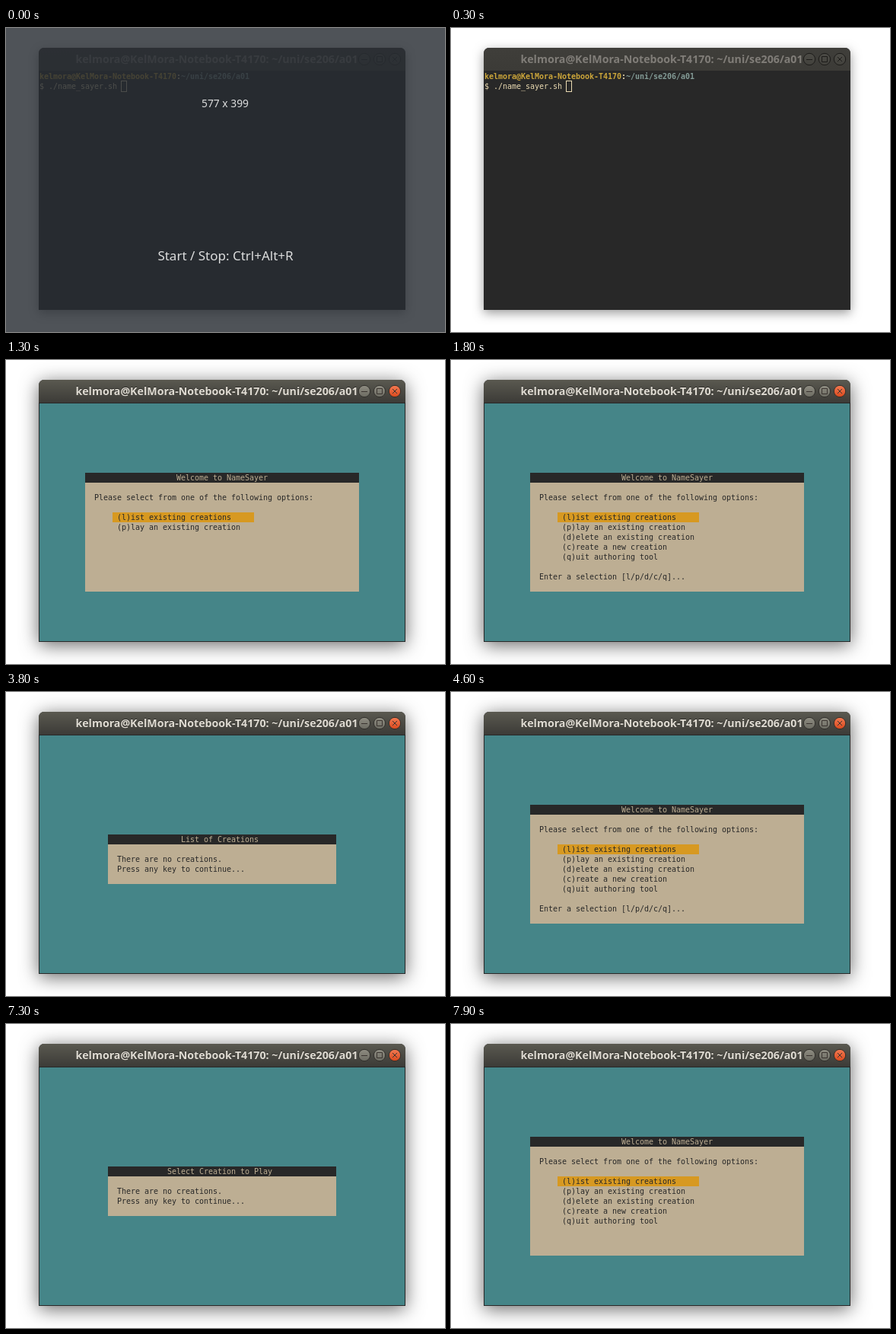
These frames come from a looping animation (577x399 px, 8 s). An HTML page with a canvas:

```html
<!DOCTYPE html>
<html lang="en">
<head>
<meta charset="utf-8">
<title>Terminal session</title>
<style>
html, body { margin: 0; width: 100%; height: 100%; overflow: hidden; background: #fff; }
canvas { display: block; width: 577px; height: 399px; }
</style>
</head>
<body>
<canvas id="stage" width="577" height="399"></canvas>
<script>
const ctx = document.getElementById('stage').getContext('2d');
const LOOP = 8000;
const SANS = '"Noto Sans", "Open Sans", sans-serif';
const MONO = '"DejaVu Sans Mono", monospace';
const USER = 'kelmora';
const HOST = 'KelMora-Notebook-T4170';
const DIR = '~/uni/se206/a01';
const C = {
  bg: '#282828', fg: '#ebdbb2', teal: '#458588', panel: '#bdae93',
  gold: '#d79921', user: '#cba53a', path: '#839b96'
};
const WIN = { x: 43, y: 26, w: 482, h: 344, bar: 30 };
const CELL = { x: 44, y: 57, w: 6, h: 13 };
const ITEMS = [
  '(l)ist existing creations',
  '(p)lay an existing creation',
  '(d)elete an existing creation',
  '(c)reate a new creation',
  '(q)uit authoring tool'
];

function rect(x, y, w, h, color) {
  ctx.fillStyle = color;
  ctx.fillRect(x, y, w, h);
}

function cells(col, row, cols, rows, color) {
  rect(CELL.x + col * CELL.w, CELL.y + row * CELL.h, cols * CELL.w, rows * CELL.h, color);
}

// Terminal text sits on a fixed character grid.
function print(text, col, row, color, bold) {
  ctx.font = (bold ? 'bold ' : '') + '10px ' + MONO;
  ctx.textAlign = 'left';
  ctx.fillStyle = color;
  [...text].forEach((ch, i) =>
    ctx.fillText(ch, CELL.x + (col + i) * CELL.w, CELL.y + row * CELL.h + 10));
}

function label(text, y, font, color) {
  ctx.font = font;
  ctx.textAlign = 'center';
  ctx.fillStyle = color;
  ctx.fillText(text, 0, y);
}

function centred(text, x, y, font, color) {
  ctx.save();
  ctx.translate(x, 0);
  label(text, y, font, color);
  ctx.restore();
}

function button(x, kind, focused) {
  const y = 41;
  const g = ctx.createLinearGradient(0, y - 8, 0, y + 8);
  const close = kind === 'close';
  const tones = !focused ? ['#4c4b46', '#42413c']
    : close ? ['#f37b53', '#d9481c'] : ['#8f8d82', '#6b6a61'];
  g.addColorStop(0, tones[0]);
  g.addColorStop(1, tones[1]);
  ctx.beginPath();
  ctx.arc(x, y, 7.7, 0, Math.PI * 2);
  ctx.fillStyle = g;
  ctx.fill();
  ctx.lineWidth = 1;
  ctx.strokeStyle = focused ? '#2f2e2a' : '#1c1b19';
  ctx.stroke();

  ctx.beginPath();
  if (kind === 'min') {
    ctx.moveTo(x - 4, y + 0.5);
    ctx.lineTo(x + 4, y + 0.5);
  } else if (kind === 'max') {
    ctx.rect(x - 3.5, y - 3.5, 7, 7);
  } else {
    ctx.moveTo(x - 3, y - 3);
    ctx.lineTo(x + 3, y + 3);
    ctx.moveTo(x + 3, y - 3);
    ctx.lineTo(x - 3, y + 3);
  }
  ctx.strokeStyle = focused ? '#3a3430' : '#1c1b19';
  ctx.stroke();
}

function frame(focused) {
  const { x, y, w, h, bar } = WIN;
  rect(0, 0, 577, 399, '#fff');

  ctx.save();
  ctx.shadowColor = focused ? 'rgba(0,0,0,.6)' : 'rgba(0,0,0,.4)';
  ctx.shadowBlur = focused ? 24 : 14;
  ctx.shadowOffsetY = 4;
  ctx.beginPath();
  ctx.roundRect(x, y, w, h, [7, 7, 0, 0]);
  ctx.fillStyle = C.bg;
  ctx.fill();
  ctx.restore();

  const g = ctx.createLinearGradient(0, y, 0, y + bar);
  g.addColorStop(0, focused ? '#5a5950' : '#3f3e3a');
  g.addColorStop(1, focused ? '#3c3b37' : '#3c3b37');
  ctx.beginPath();
  ctx.roundRect(x, y, w, bar, [7, 7, 0, 0]);
  ctx.fillStyle = g;
  ctx.fill();

  const title = USER + '@' + HOST + ': ' + DIR;
  const font = 'bold 14.2px ' + SANS;
  if (focused) centred(title, 277, 45, font, '#2b2a27');
  centred(title, 277, 46, font, focused ? '#dfdbd2' : '#807d78');
  button(471, 'min', focused);
  button(491, 'max', focused);
  button(511, 'close', focused);
}

function shell(focused) {
  const name = USER + '@' + HOST;
  print(name, 0, 0, C.user, true);
  print(':', name.length, 0, C.fg, true);
  print(DIR, name.length + 1, 0, C.path, true);
  print('$ ./name_sayer.sh', 0, 1, C.fg);
  if (focused) {
    cells(18, 1, 1, 1, C.fg);
  } else {
    ctx.lineWidth = 1;
    ctx.strokeStyle = C.fg;
    ctx.strokeRect(151.5, 69.5, 7, 14);
  }
}

function pointer() {
  const beam = () => {
    ctx.beginPath();
    ctx.moveTo(215.5, 73.5);
    ctx.lineTo(219.5, 73.5);
    ctx.moveTo(217.5, 73.5);
    ctx.lineTo(217.5, 87.5);
    ctx.moveTo(215.5, 87.5);
    ctx.lineTo(219.5, 87.5);
    ctx.stroke();
  };
  ctx.lineCap = 'square';
  ctx.strokeStyle = '#fff';
  ctx.lineWidth = 2.6;
  beam();
  ctx.strokeStyle = '#000';
  ctx.lineWidth = 1;
  beam();
  ctx.lineCap = 'butt';
}

function panel(col, row, cols, rows, title) {
  cells(0, 0, 80, 24, C.teal);
  cells(col, row, cols, rows, C.panel);
  cells(col, row, cols, 1, C.bg);
  print(title, col + Math.floor((cols - title.length) / 2), row, C.panel);
}

function menu(selected, count, ask) {
  panel(10, 7, 60, 12, 'Welcome to NameSayer');
  print('Please select from one of the following options:', 12, 9, C.bg);
  cells(16, 11 + selected, 31, 1, C.gold);
  ITEMS.slice(0, count).forEach((item, i) => print(item, 17, 11 + i, C.bg));
  if (ask) print('Enter a selection [l/p/d/c/q]...', 12, 17, C.bg);
}

function notice(title) {
  panel(15, 10, 50, 5, title);
  print('There are no creations.', 17, 12, C.bg);
  print('Press any key to continue...', 17, 13, C.bg);
}

function recorder() {
  rect(0, 0, 577, 399, 'rgba(40,45,51,.816)');
  centred('577 x 399', 288, 104, '13.8px ' + SANS, '#dcdddd');
  centred('Start / Stop: Ctrl+Alt+R', 288.5, 304.5, '17px ' + SANS, '#dcdddd');
}

function draw(t) {
  const focused = t >= 800;
  frame(focused);
  if (t < 1300) {
    shell(focused);
    if (t >= 600 && t < 1200) pointer();
    if (t < 300) recorder();
  }
  else if (t < 1800) menu(0, 2, false);
  else if (t < 3800) menu(0, 5, true);
  else if (t < 4600) notice('List of Creations');
  else if (t < 5300) menu(0, 5, true);
  else if (t < 7300) menu(1, 5, true);
  else if (t < 7900) notice('Select Creation to Play');
  else menu(0, 5, false);
}

let start;
function tick(now) {
  if (start === undefined) start = now;
  draw((now - start) % LOOP);
  requestAnimationFrame(tick);
}
draw(0);
requestAnimationFrame(tick);
</script>
</body>
</html>
```
